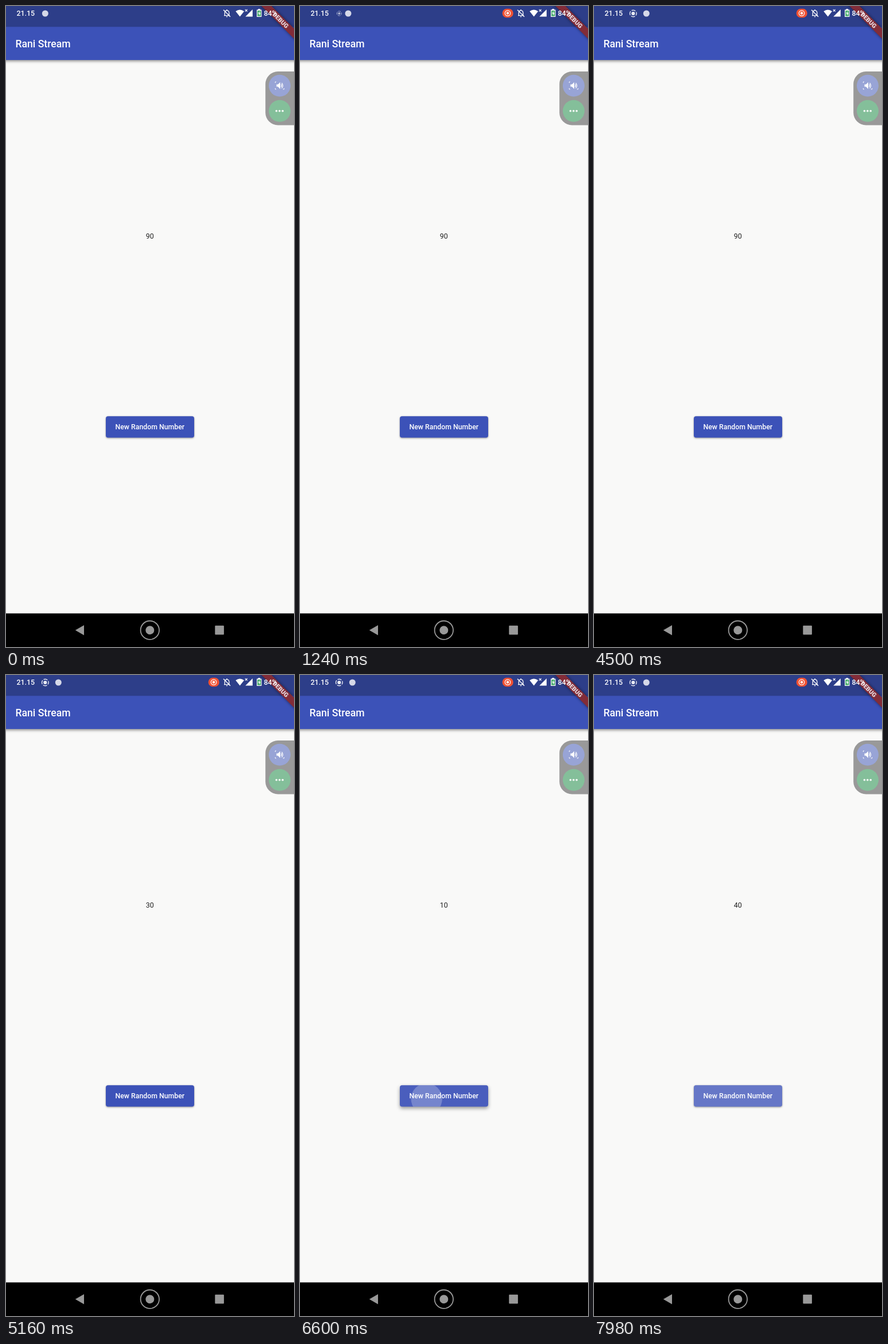
Recreate the animation shown at these times as an HTML page. Size 502 by 1116 pixels, loop 8000 ms.

```html
<!DOCTYPE html>
<html lang="en">
<head>
<meta charset="utf-8">
<title>Random number screen</title>
<style>
  html, body { margin: 0; width: 100%; height: 100%; overflow: hidden; background: #f9f9f8; }
  svg { display: block; width: 100vw; height: 100vh; }
  text { font-family: Roboto, "Noto Sans", sans-serif; }
  .medium { font-weight: 500; fill: #fff; }
  .line { fill: none; stroke: #fff; }
  #appBar { filter: drop-shadow(0 2px 2.4px rgba(0, 0, 0, .45)); }
</style>
</head>
<body>
<svg viewBox="0 0 502 1116" preserveAspectRatio="none">
  <defs>
    <clipPath id="buttonClip"><rect x="174" y="714.3" width="154" height="37.2" rx="4"/></clipPath>
    <filter id="soft" x="-20%" y="-60%" width="140%" height="220%"><feGaussianBlur stdDeviation="2.4"/></filter>
  </defs>
  <rect width="502" height="1116" fill="#f9f9f8"/>

  <rect id="appBar" x="-10" width="522" height="94" fill="#3c52b8"/>
  <rect width="502" height="36.3" fill="#2d3e89"/>
  <text class="medium" x="16.5" y="71.8" font-size="17.6">Rani Stream</text>

  <text id="number" x="250.7" y="405.4" font-size="12.4" text-anchor="middle" fill="#202020">90</text>

  <rect id="button" x="174" y="714.3" width="154" height="37.2" rx="4" fill="#3c52b8"/>
  <g clip-path="url(#buttonClip)" fill="#fff">
    <rect id="highlight" x="173" y="714" width="156" height="38"/>
    <circle id="splash" cx="220.7" cy="738"/>
  </g>
  <text class="medium" x="250.8" y="737.4" font-size="12.3" text-anchor="middle">New Random Number</text>

  <!-- corner banner -->
  <g transform="translate(502 0) rotate(45)">
    <rect x="-50" y="27.8" width="100" height="12.3" fill="#000" opacity=".5" filter="url(#soft)"/>
    <rect x="-50" y="27.8" width="100" height="12.3" fill="#822c38"/>
    <text x="1" y="37.7" font-size="10.6" font-weight="900" text-anchor="middle" fill="#e9dde2">DEBUG</text>
  </g>

  <!-- status bar -->
  <text class="medium" x="18.5" y="17.3" font-size="12.4">21.15</text>
  <circle id="appMark" cy="13" r="5.5" fill="#d5d8e8"/>
  <g id="recIcon" fill="#e8eaf3">
    <circle r="3.1"/>
    <circle r="5.8" fill="none" stroke="#e8eaf3" stroke-width="1.4" stroke-dasharray="7.1 2" stroke-dashoffset="3.5"/>
  </g>
  <g id="chip">
    <rect x="352.7" y="4.8" width="19" height="15.4" rx="7.5" fill="#f05234"/>
    <circle class="line" cx="362" cy="12.5" r="4.7" stroke-width="1.2"/>
    <circle cx="362" cy="12.5" r="2.2" fill="#fff"/>
  </g>
  <g class="line" stroke-width="1.3">
    <path d="M380 16.6H390M381.3 16V11.5Q381.6 8 385 7.6Q388.6 8 388.8 11.5V16"/>
    <path d="M379 6.8L391 18.8" stroke-width="1.4"/>
    <path d="M384 18.6H386M385 6V7.6"/>
  </g>
  <g fill="#fff">
    <path d="M400.3 9.3Q407.6 3.8 415 9.3L407.7 18.6Z"/>
    <path d="M417.3 18.6L429.8 6V18.6Z"/>
    <path d="M416.8 5.8L420.6 9.6M420.6 5.8L416.8 9.6" stroke="#fff" stroke-width="1.2"/>
    <path d="M439.5 5H443V6.5H445.4V19H437.1V6.5H439.5Z"/>
    <rect x="438.3" y="8" width="5.9" height="9.8" fill="#3fa866"/>
    <path d="M442 8.6L439.4 13.4H441.1V17L443.6 12.2H442Z"/>
  </g>
  <text class="medium" x="449.4" y="17.3" font-size="12.4">84%</text>

  <!-- floating controls -->
  <path d="M502 114H474A21.8 21.8 0 0 0 452.2 135.8V185.7A21.8 21.8 0 0 0 474 207.5H502Z" fill="#999"/>
  <circle cx="477" cy="138.8" r="19" fill="#98a4d6"/>
  <circle cx="477" cy="182.8" r="19" fill="#84bf9a"/>
  <path d="M471.5 136.5H474L478 132.7V144.4L474 140.6H471.5Z" fill="#fff"/>
  <g class="line" stroke-width="1.2">
    <path d="M479.6 136Q481.4 138.5 479.6 141.1M480.6 133.8Q484.5 138.5 480.6 143.3"/>
    <path d="M469.3 134V132H471M469.3 143V145H471M482.7 145H484.7V143" stroke-width=".9"/>
  </g>
  <g fill="#fff">
    <circle cx="471.4" cy="182.8" r="1.8"/><circle cx="476.8" cy="182.8" r="1.8"/><circle cx="482.2" cy="182.8" r="1.8"/>
  </g>

  <!-- navigation bar -->
  <rect y="1057.5" width="502" height="58.5" fill="#000"/>
  <g fill="#999">
    <path d="M120.8 1086.7L136 1078V1095.5Z"/>
    <circle cx="250.8" cy="1086.7" r="7.5"/>
    <circle cx="250.8" cy="1086.7" r="16.2" fill="none" stroke="#999" stroke-width="1.8"/>
    <rect x="364.3" y="1078.8" width="15.6" height="15.8" rx="1"/>
  </g>
</svg>
<script>
const LOOP = 8000;
const $ = id => document.getElementById(id);
const clamp = v => Math.max(0, Math.min(1, v));
const span = (t, a, b) => clamp((t - a) / (b - a));
const ease = p => 1 - (1 - p) ** 3;

const holds = [[0, 120], [440, 540], [1960, 4500], [4500, 4600],
  [5760, 5880], [6600, 6720], [6720, 6860]];

const taps = [
  { down: 4500, up: 4800, value: 30 },
  { down: 5320, up: 5605, value: 10 },
  { down: 6440, up: 6900, value: 70 },
  { down: 7440, up: 7875, value: 40 }
];

function drawButton(t) {
  const tap = taps.filter(p => p.down <= t).pop();
  const done = taps.filter(p => p.up <= t).pop();
  $('number').textContent = done ? done.value : 90;

  let fade = 0, radius = 0, press = 0, rise = 0;
  if (tap) {
    const release = span(t, tap.up, tap.up + 200);
    fade = 1 - release;
    press = span(t, tap.down + 100, tap.down + 300) * fade;
    rise = ease(span(t, tap.down, tap.down + 200)) * (1 - ease(release));
    // Slow growth while held, quick spread after release
    radius = 0.17 * (Math.min(t, tap.up) - tap.down) + Math.max(0, t - tap.up);
  }
  $('highlight').setAttribute('opacity', 0.24 * press);
  $('splash').setAttribute('opacity', 0.24 * fade);
  $('splash').setAttribute('r', Math.min(radius, 112));
  const lift = 1.4 + 1.8 * rise;
  $('button').style.filter = `drop-shadow(0 ${lift}px ${lift}px rgba(0,0,0,.4))`;
}

function drawStatus(t) {
  $('chip').setAttribute('opacity', span(t, 120, 500));
  const slide = ease(span(t, 1120, 1500));
  $('appMark').setAttribute('cx', 68.3 + 23 * slide);
  $('recIcon').setAttribute('opacity', slide);
  $('recIcon').setAttribute('transform', `translate(68.3 13) scale(${slide})`);
}

function draw(now) {
  const time = now % LOOP;
  const hold = holds.find(([a, b]) => time >= a && time < b);
  const t = hold ? hold[0] : time;
  drawButton(t);
  drawStatus(t);
}

const start = performance.now();
function tick() {
  draw(performance.now() - start);
  requestAnimationFrame(tick);
}
tick();
</script>
</body>
</html>
```
